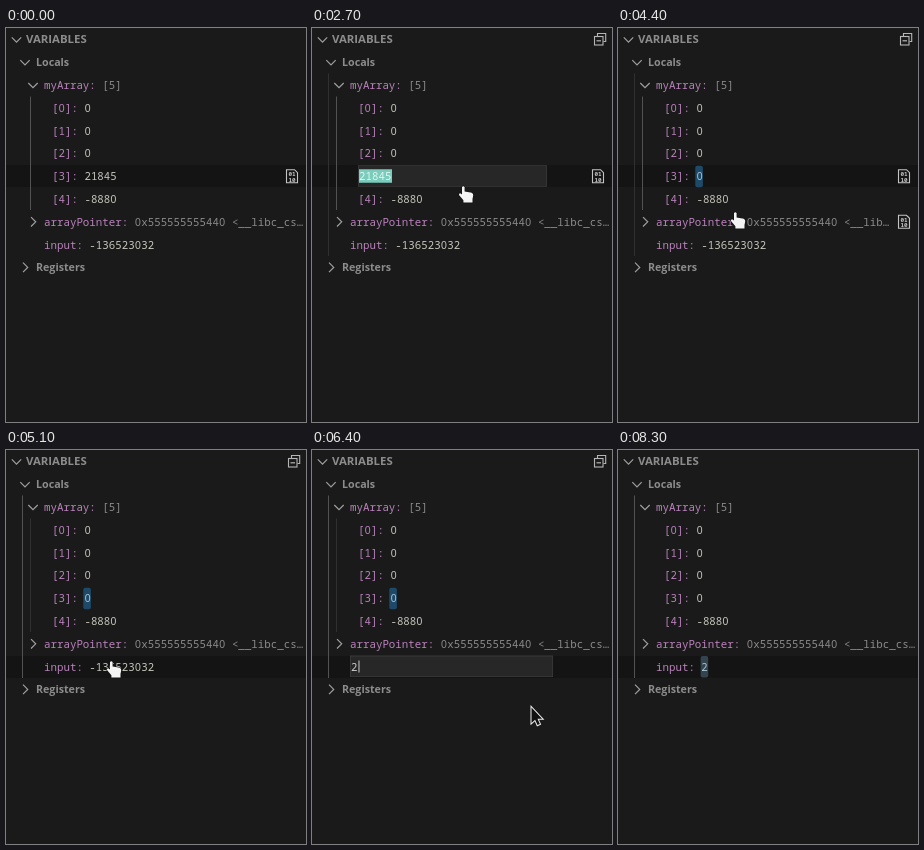
Recreate the animation shown at these times as an HTML page with a canvas. Size 300 by 394 pixels, loop 8800 ms.

```html
<!DOCTYPE html>
<html lang="en">
<head>
<meta charset="utf-8">
<title>Debugger variables</title>
<style>
html, body { margin: 0; width: 100%; height: 100%; overflow: hidden; background: #1a1a1a; }
canvas { display: block; width: 300px; height: 394px; }
</style>
</head>
<body>
<canvas id="view" width="300" height="394"></canvas>
<script>
const c = document.getElementById('view').getContext('2d');
const LOOP = 8800, CELL = 6.48;
const BG = '#1a1a1a', PURPLE = '#ba82bc', VALUE = '#c6c6bc', GREY = '#8a8a8a', LABEL = '#8c8c8c';
const MONO = '500 10.8px "Noto Sans Mono", monospace';
const ZERO = '10.5px "Liberation Sans", sans-serif';

// Pointer path: [time, x, y]
const PATH = [[900, 245, 40], [1000, 205, 85], [1100, 165, 130], [1200, 148, 154],
  [1400, 144, 161], [1600, 139, 154], [2200, 139, 154], [2500, 154, 166],
  [4200, 154, 166], [4400, 120, 192], [5000, 110, 218], [5200, 106, 220],
  [5400, 148, 249], [5500, 148, 249], [5900, 224, 266], [7000, 224, 266],
  [7100, 194, 244], [7200, 235, 222], [7300, 282, 200]];

const rowY = i => 11.4 + 22.8 * i;
const within = (t, a, b) => t >= a && t < b;

function rect(x, y, w, h, color, r = 0) {
  c.fillStyle = color;
  c.beginPath();
  c.roundRect(x, y, w, h, r);
  c.fill();
}

function line(color, width, ...pts) {
  c.strokeStyle = color;
  c.lineWidth = width;
  c.beginPath();
  pts.forEach(([x, y]) => c.lineTo(x, y));
  c.stroke();
}

// Monospaced text with plain, unslashed zeros
function mono(s, x, row, color) {
  const y = rowY(row) + 4;
  c.fillStyle = color;
  c.font = MONO;
  c.fillText(s.replace(/0/g, ' '), x, y);
  c.font = ZERO;
  [...s].forEach((ch, i) => { if (ch === '0') c.fillText(ch, x + i * CELL + .3, y); });
}

function entry(name, value, x, row, nameColor = PURPLE, color = VALUE) {
  mono(name + ':', x, row, nameColor);
  mono(value, x + (name.length + 2) * CELL, row, color);
}

function label(s, x, row, size = 10.7, color = LABEL) {
  c.font = `bold ${size}px "Open Sans", sans-serif`;
  c.fillStyle = color;
  c.fillText(s, x, rowY(row) + 3.9);
}

function chevron(x, row, open, color = '#a0a0a0') {
  const y = rowY(row);
  if (open) line(color, 1.2, [x - 4.7, y - 2], [x, y + 2.7], [x + 4.7, y - 2]);
  else line(color, 1.2, [x - 2, y - 4.7], [x + 2.7, y], [x - 2, y + 4.7]);
}

function collapseIcon() {
  c.strokeStyle = '#b5b5b5';
  c.lineWidth = 1.1;
  c.strokeRect(282.5, 8.5, 8.5, 8.5);
  line('#b5b5b5', 1.1, [285.5, 8], [285.5, 5.5], [293.7, 5.5], [293.7, 13.5], [291.5, 13.5]);
  line('#b5b5b5', 1.2, [284.5, 12.8], [289, 12.8]);
}

function binaryIcon(row) {
  const y = rowY(row);
  line('#c4c4c4', 1.1, [280.5, y - 6.5], [288.5, y - 6.5], [291.5, y - 3.5],
    [291.5, y + 6.5], [280.5, y + 6.5], [280.5, y - 7]);
  c.font = 'bold 6px "Noto Sans Mono", monospace';
  c.fillStyle = '#c4c4c4';
  c.fillText('01', 282.4, y + .2);
  c.fillText('10', 282.4, y + 5.4);
}

function editor(x, row, right, text, selected) {
  const y = rowY(row);
  rect(x, y - 11, right - x, 21.5, '#3a3a3a');
  rect(x + .8, y - 10.2, right - x - 1.6, 19.9, '#272727');
  if (selected) rect(x + 1, y - 7, text.length * CELL + .6, 13.5, '#7accbc');
  mono(text, x + 1, row, selected ? '#e2f5f0' : '#cccccc');
  if (!selected) rect(x + 2 + text.length * CELL, y - 6, 1, 12, '#cccccc');
}

function shape(x, y, path, fill, stroke, width) {
  const p = new Path2D(path);
  c.save();
  c.translate(x, y);
  c.lineWidth = width;
  c.strokeStyle = stroke;
  c.stroke(p);
  c.fillStyle = fill;
  c.fill(p);
  c.restore();
}

function pointer(t) {
  if (!within(t, 900, 7400)) return;
  let i = PATH.findIndex(k => k[0] > t);
  if (i < 0) i = PATH.length - 1;
  const [t0, x0, y0] = PATH[i - 1], [t1, x1, y1] = PATH[i];
  const k = Math.min(1, (t - t0) / (t1 - t0));
  const x = x0 + (x1 - x0) * k, y = y0 + (y1 - y0) * k;
  if (within(t, 5600, 7100)) {
    shape(x - 4.5, y - 8.5, 'M0 0V15.5L3.6 12.2L6 17.6L8.4 16.5L6 11.3H10.6Z', '#111', '#eee', 2);
  } else {
    shape(x, y, 'M-4 -7Q-2.7 -8.4 -1.4 -7V-2.4L4.5 -1.4Q7.3 -1 7.2 1.5L6.5 5V8.6H-2.6V6.2L-7 1Q-7.2 -1 -5.4 -.6L-4 .5Z',
      '#f4f4f4', '#111', 1.2);
  }
}

function draw(t) {
  const hover = within(t, 900, 7500);
  const editArray = within(t, 2700, 3800), editInput = within(t, 5600, 6500);
  const arrayFocus = t < 4900, arraySet = t >= 3800, inputSet = t >= 6500;
  const arrayLit = arraySet && !inputSet;
  const pointed = within(t, 1400, 2700), pointerHover = within(t, 4300, 4700);
  const registersHover = within(t, 7100, 7300);

  rect(0, 0, 300, 394, BG);
  rect(0, Math.round(rowY(arrayFocus ? 6 : 9)) - 11, 300, 22, pointed ? '#191919' : '#141414');

  // Indent guides
  const bright = '#525252', dim = '#303030';
  if (hover || !arrayFocus) rect(16, 45.5, 1, 182.5, arrayFocus ? dim : bright);
  if (hover || arrayFocus) rect(24, 68.5, 1, 113.5, arrayFocus ? bright : dim);

  chevron(10.5, 0, true);
  label('VARIABLES', 20, 0, 11.4);
  chevron(19, 1, true);
  label('Locals', 30, 1);
  chevron(27, 2, true);
  entry('myArray', '[5]', 38, 2, PURPLE, GREY);

  for (let i = 0; i < 5; i++) {
    if (i === 3 && editArray) continue;
    const value = i === 4 ? '-8880' : i === 3 && !arraySet ? '21845' : '0';
    if (i === 3 && arrayLit) rect(77.3, rowY(6) - 10.5, 7.6, 21.5, '#1d4a69', 2);
    const lit = i === 3 && pointed;
    entry(`[${i}]`, value, 46, i + 3, lit ? '#a9a5ce' : PURPLE,
      lit ? '#b3ccd7' : i === 3 && arrayLit ? '#a9c3d0' : VALUE);
  }

  chevron(27, 8, false);
  entry('arrayPointer', '0x555555555440 <__lib' + (pointerHover ? '…' : 'c_cs…'), 38, 8, PURPLE, GREY);

  if (!editInput) {
    if (inputSet) rect(82.6, rowY(9) - 10.5, 7.6, 21.5, t < 8100 ? '#1d4a69' : '#33444f', 2);
    entry('input', inputSet ? '2' : '-136523032', 38, 9, PURPLE, inputSet ? '#a9c3d0' : VALUE);
  }

  chevron(19, 10, false, registersHover ? '#dedede' : undefined);
  label('Registers', 30, 10, 10.7, registersHover ? '#f0f0f0' : LABEL);

  if (editArray) editor(46, 6, 235, t < 3500 ? '21845' : '0', t < 3500);
  if (editInput) editor(38, 9, 241, t < 6200 ? '-136523032' : '2', t < 6200);
  if (hover) collapseIcon();
  if (arrayFocus) binaryIcon(6);
  if (pointerHover) binaryIcon(8);
  pointer(t);
}

const start = performance.now();
function tick() {
  const t = (performance.now() - start) % LOOP;
  draw(Math.floor(t / 100) * 100);
  requestAnimationFrame(tick);
}
tick();
</script>
</body>
</html>
```
